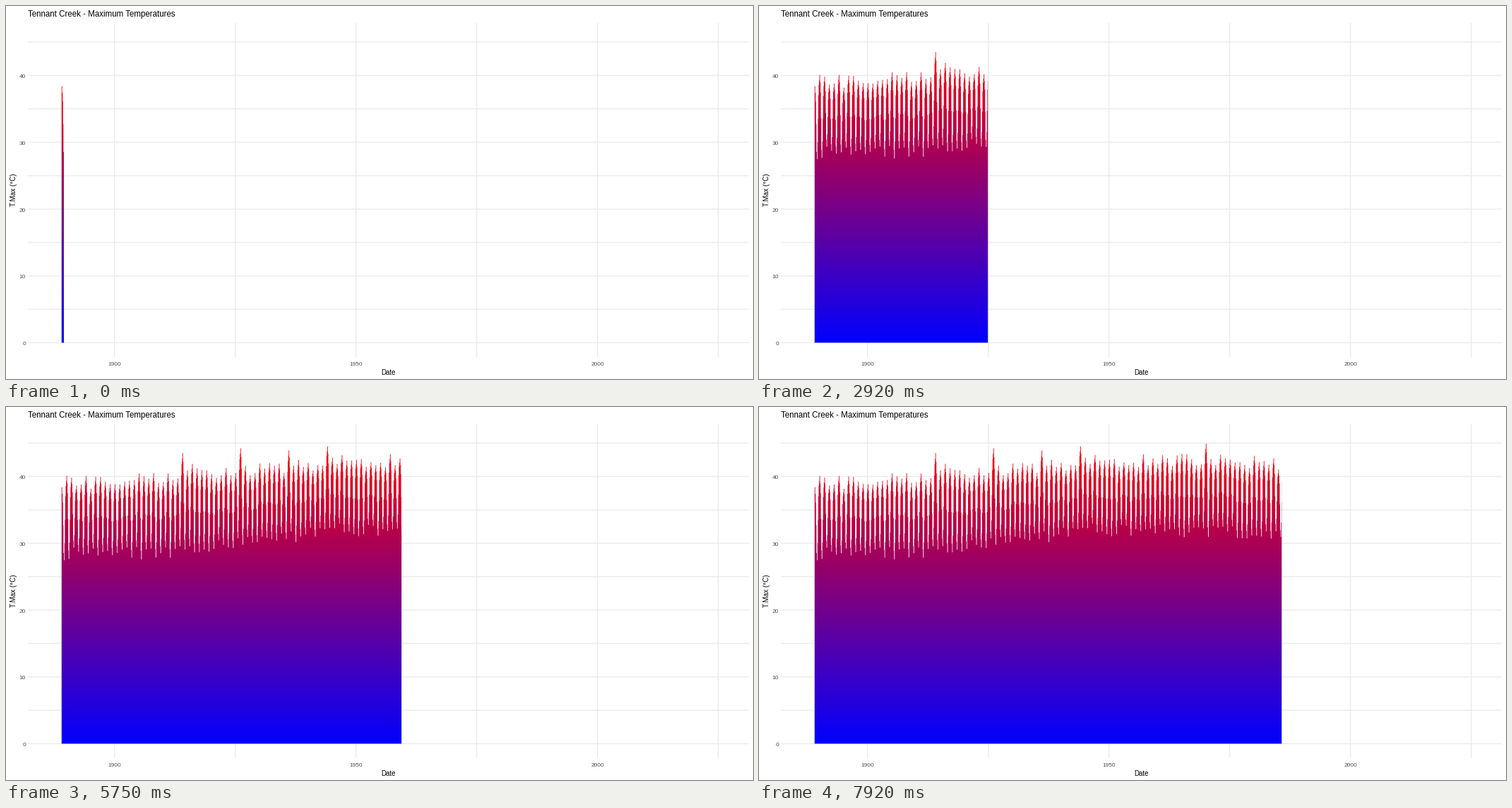
A matplotlib script that plays this animation: 1058x529 px, repeating every 8 s.

```python
import matplotlib.pyplot as plt
import numpy as np
from matplotlib.animation import FuncAnimation

W, H, DPI = 1058, 529, 64
FRAMES, INTERVAL = 200, 40       # one loop of 8 s
STEPS_PER_SECOND, LEAD = 12, .03

ZERO_Y, DEG = 477.5, 9.475       # pixel row of 0 degrees, pixels per degree
X_1900, YEAR = 153.7, 6.84       # pixel column of 1900, pixels per year
START_X, MONTH, OVERLAP = 78.95, YEAR / 12, .15
FIRST_YEAR, YEARS = 1889, 97
FIRST_MONTHS, MONTHS_PER_STEP = 5, 12.167
LEFT, RIGHT, TOP, BOTTOM = 70, 760, 40, 480   # pixel window of the bars
GRID, TICK = "#ebebeb", "#4d4d4d"

# Share of the yearly range reached in each month, January first
SEASON = np.array([1, .91, .79, .48, .1, 0, 0, .2, .48, .76, .88, .94])
RECORDS = {1889: 38.4, 1914: 43.5, 1926: 44.2, 1936: 43.9,
           1944: 44.5, 1970: 44.9}

rng = np.random.default_rng(7)


def wander(years, knots, levels, spread):
    """Slow trend through a few levels, with yearly scatter."""
    scatter = rng.uniform(-spread, spread, len(years))
    return np.interp(years, knots, levels) + scatter


def monthly_series():
    years = FIRST_YEAR + np.arange(YEARS + 1)
    peaks = wander(years, [1889, 1908, 1914, 1926, 1944, 1970, 1986],
                   [39.2, 39.4, 41, 40.8, 42.1, 42.5, 42.1], 1.1)
    for year, peak in RECORDS.items():
        peaks[year - FIRST_YEAR] = peak
    troughs = wander(years, [1889, 1908, 1930, 1945, 1986],
                     [28.4, 28.6, 30.2, 32, 31.6], 1)[:YEARS, None]
    # The second half of a year climbs towards the next summer
    summer = np.where(np.arange(12) < 6, peaks[:-1, None], peaks[1:, None])
    return (troughs + SEASON * (summer - troughs)).ravel()


def bar_coverage(temps, sub=8):
    """Antialiased share of each pixel that lies inside the bars."""
    x = LEFT + (np.arange((RIGHT - LEFT) * sub) + .5) / sub
    padded = np.concatenate([[0], temps, [0]])

    def height(at):
        month = np.floor((at - START_X) / MONTH).astype(int)
        return padded[np.clip(month + 1, 0, len(temps) + 1)]

    h = np.maximum(height(x - OVERLAP), height(x + OVERLAP))
    inside = np.clip(rows + 1 - ZERO_Y + DEG * h, 0, 1) * (h > 0)
    inside = inside * np.clip(ZERO_Y - rows, 0, 1)
    return inside.reshape(len(rows), -1, sub).mean(axis=2)


rows = np.arange(TOP, BOTTOM)[:, None]
cols = np.arange(LEFT, RIGHT)
degrees = (ZERO_Y - rows - .5) / DEG
temps = monthly_series()
coverage = bar_coverage(temps)


def bars(step):
    n = int(FIRST_MONTHS + MONTHS_PER_STEP * step)
    edge = START_X + MONTH * n + OVERLAP
    warm = np.clip(degrees / temps[:n].max(), 0, 1)
    rgba = np.zeros(coverage.shape + (4,), np.uint8)
    rgba[..., 0] = np.round(255 * warm)
    rgba[..., 2] = np.round(255 * (1 - warm))
    rgba[..., 3] = np.round(255 * coverage * np.clip(edge - cols, 0, 1))
    return rgba


def label(x, y, text, px, color="black", **kw):
    ax.text(x, y, text, fontsize=px * 72 / DPI, color=color,
            family="Liberation Sans", va="baseline", **kw)


fig = plt.figure(figsize=(W / DPI, H / DPI), dpi=DPI, facecolor="white")
ax = fig.add_axes([0, 0, 1, 1])
image = ax.imshow(bars(0), extent=(LEFT, RIGHT, BOTTOM, TOP),
                  interpolation="nearest", aspect="auto", zorder=3)
ax.set_xlim(0, W)
ax.set_ylim(H, 0)
ax.axis("off")

line = dict(color=GRID, lw=1.4 * 72 / DPI, snap=False,
            solid_capstyle="butt", zorder=1)
for value in range(0, 50, 5):
    y = ZERO_Y - DEG * value
    ax.plot([31, 1052], [y, y], **line)
    if value % 10 == 0:
        label(28, y + 3.5, str(value), 8.2, TICK, ha="right")
for year in range(1900, 2026, 25):
    x = X_1900 + YEAR * (year - 1900)
    ax.plot([x, x], [24, 498], **line)
    if year % 50 == 0:
        label(x, 510.5, str(year), 8.2, TICK, ha="center")

label(31, 15, "Tennant Creek - Maximum Temperatures", 11.55)
label(542, 523, "Date", 9.7, ha="center")
label(14, 261, "T.Max (°C)", 9.9, ha="center", rotation=90,
      rotation_mode="anchor")


def update(frame):
    seconds = frame * INTERVAL / 1000
    image.set_data(bars(int((seconds + LEAD) * STEPS_PER_SECOND)))
    return [image]


anim = FuncAnimation(fig, update, frames=FRAMES, interval=INTERVAL,
                     repeat=True, repeat_delay=0, blit=False)
plt.show()
```
